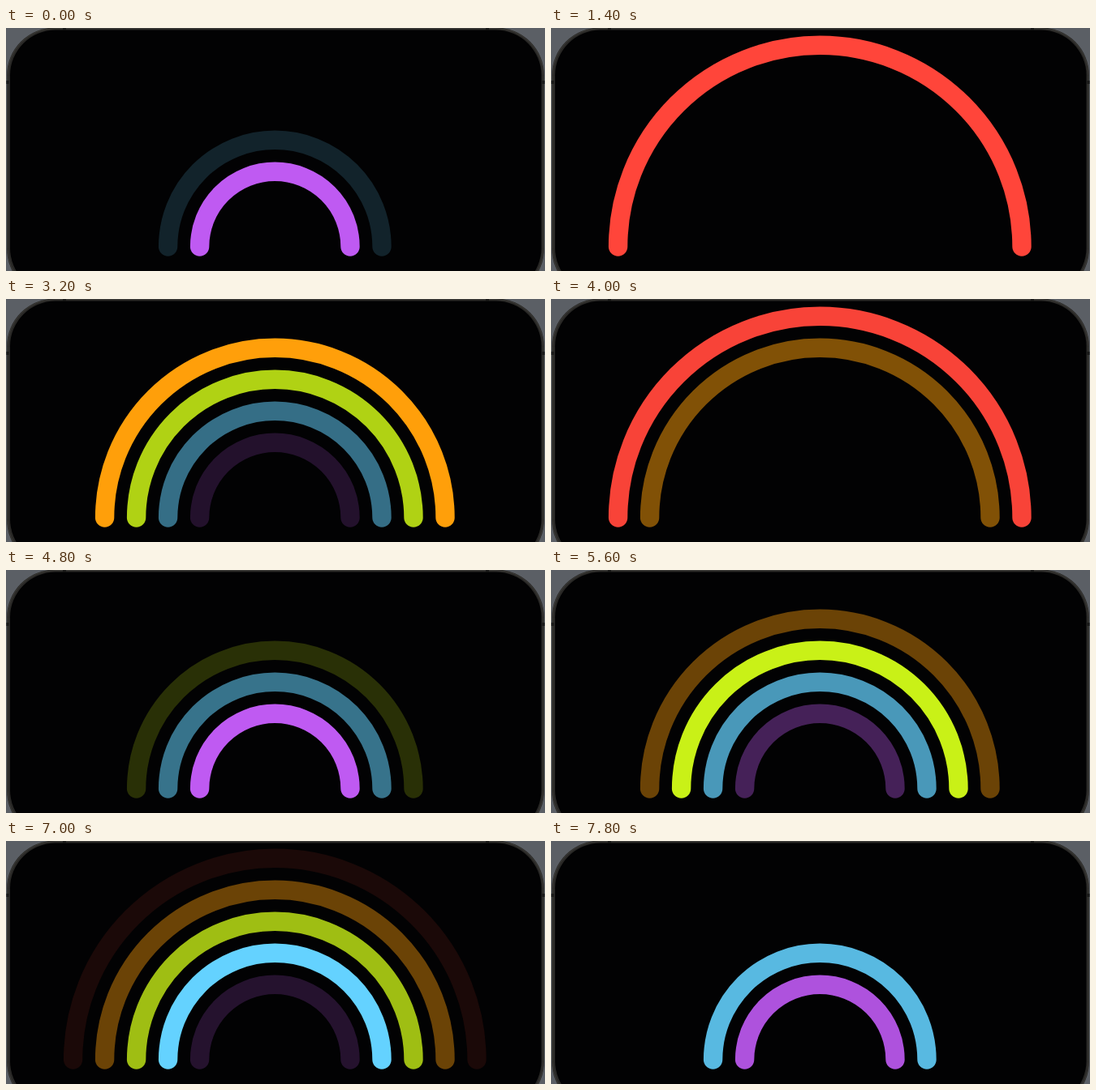
These frames come from a looping animation (664 by 300 pixels, 8000 ms). An HTML page:

```html
<!DOCTYPE html>
<html lang="en">
<head>
<meta charset="utf-8">
<title>Rainbow sweep</title>
<style>
  html, body { margin: 0; width: 100%; height: 100%; overflow: hidden; background: #5b5f65; }
  svg { display: block; width: 100%; height: 100%; }
  #arcs path { fill: none; stroke-width: 23.4; stroke-linecap: round; }
</style>
</head>
<body>
<svg viewBox="0 0 664 300">
  <rect x="1" y="-.5" width="662" height="332" rx="59" fill="#292826"/>
  <rect x="2" y=".5" width="660" height="330" rx="58" fill="none" stroke="#3b3a37" stroke-width="1"/>
  <path d="M70 1h4M591 1h4M2 65v4M662 65v4" stroke="#191918" stroke-width="3"/>
  <rect x="5" y="2.5" width="654.5" height="325" rx="56" fill="#020203"/>
  <g id="arcs"></g>
</svg>
<script>
const LOOP = 8000, HOLD = 200;
const CYCLE = 2500;            // one sweep outward and back
const OUT = 250, BACK = 1500;  // when the first arc of each sweep is half lit
const STEP = 180, RISE = 150, FALL = 620, FALL_LEAD = 30;
const CENTER = { x: 331.3, y: 270 };
const colors = ['#bf5af2', '#64d2ff', '#cdf518', '#ff9f0a', '#ff453a']; // inner to outer
const last = colors.length - 1;

const arcs = colors.map((color, i) => {
  const r = 92.7 + 39 * i;
  const arc = document.createElementNS('http://www.w3.org/2000/svg', 'path');
  arc.setAttribute('d', `M${CENTER.x - r} ${CENTER.y}a${r} ${r} 0 0 1 ${2 * r} 0`);
  arc.setAttribute('stroke', color);
  document.getElementById('arcs').append(arc);
  return arc;
});

// Linear motion softened halfway towards a cosine.
function ease(u) {
  u = Math.min(1, Math.max(0, u));
  return (u + (1 - Math.cos(Math.PI * u)) / 2) / 2;
}

const outward = i => OUT + STEP * (i - 1);
const inward = i => BACK + STEP * (last - 1 - i);

// Each arc lights up at `on` and fades once its neighbour lights up at `off`.
function pulse(t, on, off) {
  const rise = ease((t - on) / RISE + 0.5);
  const fall = ease((t - off + FALL_LEAD) / FALL);
  return rise * (1 - fall);
}

function level(i, t) {
  if (i === 0) return pulse(t, inward(0) - CYCLE, outward(1)) + pulse(t, inward(0), outward(1) + CYCLE);
  if (i === last) return pulse(t, outward(last), inward(last - 1));
  const back = shift => pulse(t + shift, inward(i), inward(i - 1));
  return Math.max(pulse(t, outward(i), outward(i + 1)), back(0), back(CYCLE));
}

function draw() {
  const t = Math.floor(performance.now() % LOOP / HOLD) * HOLD % CYCLE;
  arcs.forEach((arc, i) => arc.setAttribute('opacity', level(i, t).toFixed(3)));
  requestAnimationFrame(draw);
}
draw();
</script>
</body>
</html>
```
